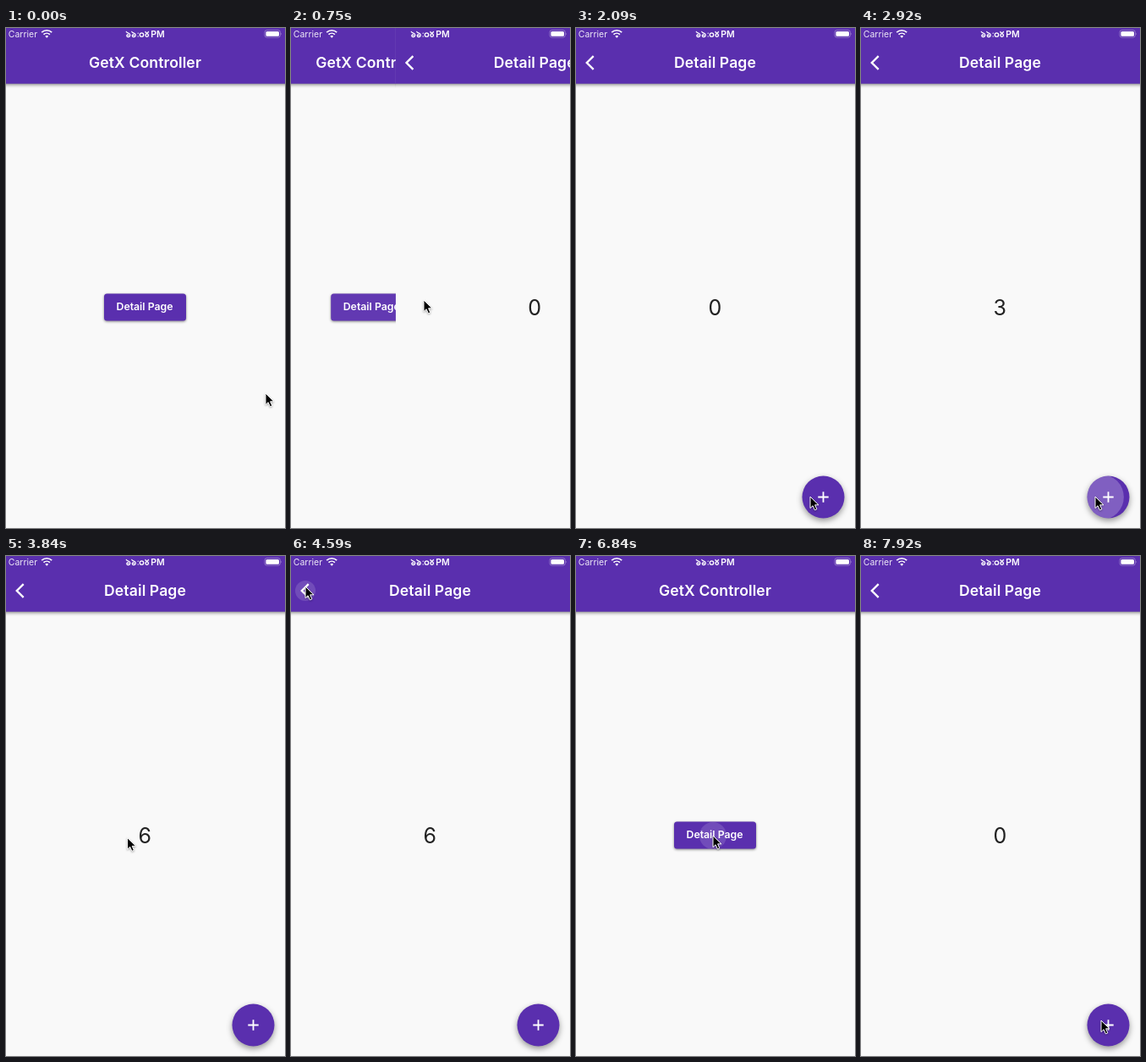
Recreate the animation shown at these times as an HTML page. Size 330x590 px, loop 8000 ms.

```html
<!DOCTYPE html>
<html lang="en">
<head>
<meta charset="utf-8">
<title>Counter demo</title>
<style>
  html, body { margin: 0; width: 100%; height: 100%; overflow: hidden; background: #f9f9f9; }
  svg { display: block; width: 100%; height: 100%; }
  text { font-family: Inter, Roboto, sans-serif; fill: #fff; }
  .mid { text-anchor: middle; font-weight: 600; }
  .title { font-size: 17.6px; letter-spacing: .1px; }
  .label { font-size: 12.3px; }
  .status { font-size: 10.5px; }
  #count { font-size: 25px; font-weight: 400; fill: #222; }
  .purple { fill: #5a2fae; }
  .bar { filter: drop-shadow(0 1.5px 2px #0008); }
  .button { filter: drop-shadow(0 1.5px 1.5px #0007); }
  .fab { filter: drop-shadow(0 3px 3.5px #0006); }
  .line { fill: none; stroke: #fff; }
  .ink { fill: #fff; }
  .page { clip-path: url(#stage); }
  #cursor { filter: drop-shadow(0 1px 1px #0005); }
</style>
</head>
<body>
<svg viewBox="0 0 330 590">
  <defs>
    <clipPath id="stage"><rect width="330" height="590"/></clipPath>
    <clipPath id="buttonClip"><rect x="116" y="313.5" width="97" height="32" rx="3.5"/></clipPath>
    <clipPath id="fabClip"><circle cx="292.5" cy="553.5" r="25"/></clipPath>
    <g id="sheet">
      <rect width="330" height="590" fill="#f9f9f9"/>
      <rect class="purple bar" x="-9" y="-9" width="348" height="74.7"/>
    </g>
  </defs>

  <g id="home" class="page">
    <use href="#sheet"/>
    <text class="mid title" x="164.5" y="47">GetX Controller</text>
    <rect class="purple button" x="116" y="313.5" width="97" height="32" rx="3.5"/>
    <g clip-path="url(#buttonClip)"><circle class="ink" id="buttonInk"/></g>
    <text class="mid label" x="164" y="333.4">Detail Page</text>
  </g>

  <g id="detail" class="page">
    <use href="#sheet"/>
    <circle class="ink" id="backInk"/>
    <path class="line" stroke-width="2.4" d="M20.7 33.2 12.8 41l7.9 7.8"/>
    <text class="mid title" x="164.5" y="47">Detail Page</text>
    <text class="mid" id="count" x="164.3" y="339">0</text>
    <circle class="purple fab" cx="292.5" cy="553.5" r="25"/>
    <g clip-path="url(#fabClip)"><circle class="ink" id="fabInk"/></g>
    <path class="line" stroke-width="1.8" d="M286.3 553.5h12.4M292.5 547.3v12.4"/>
  </g>

  <g id="statusBar">
    <text class="status" x="2.8" y="10.9" opacity=".88">Carrier</text>
    <path class="line" stroke-width="1.7" d="M42.2 5.2a8.6 8.6 0 0 1 12 0M44.5 7.7a5.4 5.4 0 0 1 7.4 0"/>
    <path fill="#fff" d="M46.3 9.7a2.8 2.8 0 0 1 3.8 0l-1.9 2z"/>
    <g class="line" stroke-width="1.3" stroke-linecap="round">
      <path id="one" d="M142.3 4.4c.6 1.8 4.4 1.2 4.5 3.9.1 2.7-3.7 2.9-4 .8-.2-1.4 1.6-1.7 2-.4"/>
      <use href="#one" x="6.5"/>
      <path d="M156.2 6.1v.1M156.2 9.8v.1"/>
      <circle cx="160.5" cy="8" r="2.2"/>
      <path d="M164.9 4.4c.2 2 3.6 1.8 3.6 4.2a1.8 1.8 0 0 1-3.6 0c0-2.2 3.2-2.2 3.5-4.2"/>
    </g>
    <text class="status" x="171.2" y="10.9" font-weight="600">PM</text>
    <rect class="line" x="306" y="2.5" width="18.4" height="8.6" rx="2.6" stroke-width=".8" opacity=".4"/>
    <rect x="307.4" y="3.9" width="15.6" height="5.8" rx="1.5" fill="#fff"/>
    <path d="M325.3 5.4q1.4 1.4 0 2.8z" fill="#fff" opacity=".5"/>
  </g>

  <path id="cursor" stroke="#fff" stroke-linejoin="round" d="M0 0V13.6l3.1-2.9 2.3 5.1 2.4-1-2.2-5H10Z"/>
</svg>
<script>
const LOOP = 8000, FPS = 12;
const HOLD = 150, SLIDE = 450;
const FAB = { first: 2333, every: 235, taps: 6, delay: 80 };
const BACK_TAP = 4583, REOPEN = 6000;

const $ = id => document.getElementById(id);
const clamp = v => Math.max(0, Math.min(1, v));
const easeOut = u => 1 - (1 - clamp(u)) ** 3.5;
const smooth = u => (u = clamp(u), u * u * (3 - 2 * u));
const move = (el, x, y) => el.setAttribute('transform', `translate(${x} ${y})`);

// Pointer moves: start time, end time, destination
const legs = [
  [0, 250, 157, 321],
  [1350, 2000, 277, 553],
  [3680, 3967, 35, 153],
  [3967, 4400, 17, 36],
  [4667, 5080, 152, 291],
  [5080, 5660, 162, 330],
  [7333, 7900, 284, 548]
];

function pointer(t) {
  let x = 307, y = 431;
  for (const [start, end, toX, toY] of legs) {
    const u = smooth((t - start) / (end - start));
    x += (toX - x) * u;
    y += (toY - y) * u;
  }
  return [x, y];
}

function ink(el, age, x, y, r, alpha) {
  const fade = age < 0 ? 0 : clamp(2 - age / HOLD);
  el.setAttribute('cx', x);
  el.setAttribute('cy', y);
  el.setAttribute('r', Math.max(0, r));
  el.setAttribute('opacity', alpha * fade);
}

function draw(ms) {
  const step = Math.floor(Math.floor(ms / 10) * 3 / 25);
  const t = step * 1000 / FPS;
  const reopened = t > REOPEN;

  const slide = start => easeOut((t - start) / SLIDE);
  const shown = slide(640) - slide(4680) + slide(6975);
  move($('home'), -110 * shown, 0);
  move($('detail'), 330 * (1 - shown), 0);

  const buttonAge = t - (reopened ? 6833 : 500);
  ink($('buttonInk'), buttonAge, 162, 330, 16 + buttonAge * .2, .14);

  const backAge = t - BACK_TAP;
  ink($('backInk'), backAge, 17, 41, Math.min(21, 12 + backAge * .1), .14);

  const tap = Math.min(FAB.taps - 1, Math.floor((t - FAB.first) / FAB.every));
  const fabAge = t - FAB.first - tap * FAB.every;
  ink($('fabInk'), tap < 0 ? -1 : fabAge, 277 + 15 * clamp(fabAge / 240), 553.5, 8 + fabAge * .165, .23);

  const counted = Math.floor((t - FAB.first - FAB.delay) / FAB.every) + 1;
  $('count').textContent = reopened ? 0 : Math.max(0, Math.min(FAB.taps, counted));

  move($('cursor'), ...pointer(t));
}

const begin = performance.now();
function tick() {
  draw((performance.now() - begin) % LOOP);
  requestAnimationFrame(tick);
}
tick();
</script>
</body>
</html>
```
